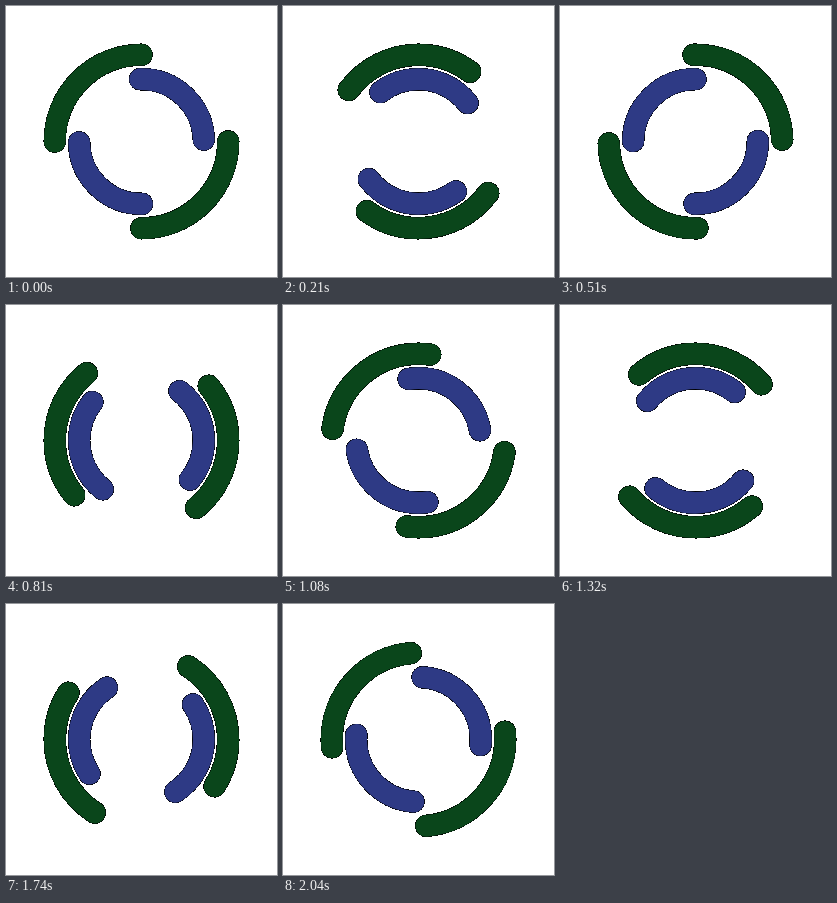
These frames come from a looping animation (271 px wide and 271 px high, 2070 ms). An HTML page:

```html
<!DOCTYPE html>
<html lang="en">
<head>
<meta charset="utf-8">
<title>Double ring spinner</title>
<style>
  html, body {
    margin: 0;
    width: 100%;
    height: 100%;
    overflow: hidden;
    background: #fff;
  }
  svg {
    display: block;
    width: 100%;
    height: 100%;
  }
  /* A path length of 4 makes every dash and gap one quarter turn. */
  circle {
    fill: none;
    stroke-width: 8;
    stroke-linecap: round;
    stroke-dasharray: 1;
    animation: 2070ms steps(69) infinite;
  }
  /* Hard dark fringe, half a pixel wider on each side. */
  .edge {
    stroke: #000;
    stroke-width: 8.37;
    shape-rendering: crispEdges;
  }
  .green { stroke: #0a461b; }
  .blue { stroke: #2e3a85; }
  .outer circle { animation-name: clockwise; }
  .inner circle { animation-name: counter; }
  @keyframes clockwise {
    from { stroke-dashoffset: 0; }
    to { stroke-dashoffset: -4; }
  }
  @keyframes counter {
    from { stroke-dashoffset: 1; }
    to { stroke-dashoffset: 5; }
  }
</style>
</head>
<body>
<svg viewBox="0 0 100 100">
  <g class="outer">
    <circle class="edge" cx="50" cy="50" r="32" pathLength="4"/>
    <circle class="green" cx="50" cy="50" r="32" pathLength="4"/>
  </g>
  <g class="inner">
    <circle class="edge" cx="50" cy="50" r="23" pathLength="4"/>
    <circle class="blue" cx="50" cy="50" r="23" pathLength="4"/>
  </g>
</svg>
</body>
</html>
```
